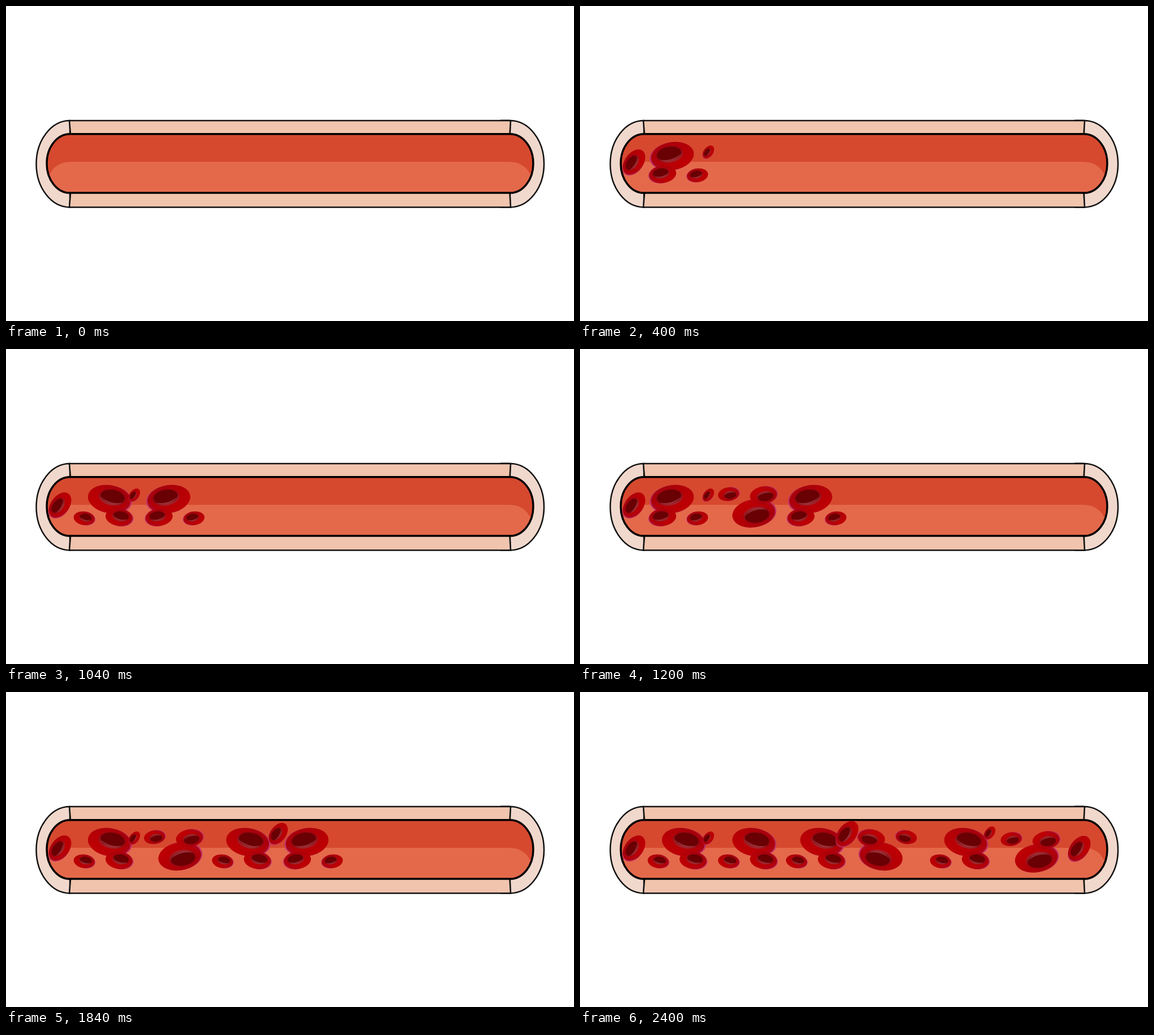
These frames come from a looping animation (1004x558 px, 2.8 s). An HTML page:

```html
<!DOCTYPE html>
<html lang="en">
<head>
<meta charset="utf-8">
<title>Blood vessel</title>
<style>
  html, body { margin: 0; width: 100%; height: 100%; overflow: hidden; background: #fff; }
  svg { display: block; width: 100vw; height: 100vh; }
</style>
</head>
<body>
<svg viewBox="0 0 1004 558">
  <defs>
    <filter id="soft" filterUnits="userSpaceOnUse" x="0" y="0" width="1004" height="558" color-interpolation-filters="sRGB">
      <feGaussianBlur stdDeviation="0.7"/>
    </filter>
    <linearGradient id="body" x1="0.1" y1="0" x2="0.8" y2="1">
      <stop offset="0" stop-color="#a2000f"/>
      <stop offset="0.45" stop-color="#b20007"/>
      <stop offset="1" stop-color="#c00003"/>
    </linearGradient>
    <linearGradient id="rim" x1="0" y1="0.4" x2="0.8" y2="0.3">
      <stop offset="0" stop-color="#c03368"/>
      <stop offset="0.4" stop-color="#ac1038"/>
      <stop offset="1" stop-color="#ba0006"/>
    </linearGradient>
    <linearGradient id="dent" x1="0.2" y1="0" x2="0.6" y2="1">
      <stop offset="0" stop-color="#8c0009"/>
      <stop offset="0.6" stop-color="#900a14"/>
      <stop offset="1" stop-color="#a3262e"/>
    </linearGradient>
    <path id="inner" d="M113 226.7H891A41 52.2 0 0 1 891 331.1H113A41 52.2 0 0 1 113 226.7Z"/>
    <clipPath id="lumen"><use href="#inner"/></clipPath>
    <g id="cell">
      <ellipse rx="39.3" ry="24.8" fill="url(#rim)"/>
      <ellipse cx="1.2" cy="-0.5" rx="38" ry="24.2" fill="url(#body)"/>
      <path d="M-33 2C-31 14-16 20 0 20" fill="none" stroke="#a80a30" stroke-width="3" opacity="0.5"/>
      <ellipse cx="-3.4" cy="-4" rx="24" ry="14.6" fill="url(#dent)"/>
      <ellipse cx="-3.8" cy="-4.8" rx="21.4" ry="12.4" fill="#690003"/>
      <path d="M-22 2C-12 7 6 6 17-2C9 9-11 12-22 2Z" fill="#a9404a" opacity="0.7"/>
    </g>
    <g id="trio">
      <use href="#cell" transform="translate(-10.8 -12.3) rotate(-10)"/>
      <use href="#cell" transform="translate(-27.6 19.8) rotate(-9) scale(.63)"/>
      <use href="#cell" transform="translate(34.2 21.6) rotate(-9) scale(.49)"/>
    </g>
  </defs>

  <g filter="url(#soft)">
    <g stroke="#111" stroke-width="2.5">
      <path fill="#f1d8cc" d="M113 203A59.5 76.7 0 0 0 113 356.4ZM891 203A60 76.7 0 0 1 891 356.4Z"/>
      <path fill="#f0c4ad" d="M112 203H892L890.5 227V332L892 356.4H112L114 332V227Z"/>
      <path d="M874 202.2H890M874 357.2H890" stroke-width="1.2"/>
    </g>
    <use href="#inner" fill="#d6492f"/>
    <path clip-path="url(#lumen)" fill="#e4694b" d="M76 301Q86 276 116 276H889Q917 276 928 301V340H76Z"/>
    <use href="#inner" fill="none" stroke="#000" stroke-width="3.5"/>
    <g id="flow"></g>
  </g>
</svg>
<script>
const STEP = 400;
const NS = "http://www.w3.org/2000/svg";
const flow = document.getElementById("flow");

const use = (id, transform) => ({ id, transform });
const trio = (x, sx = 1, sy = 1, y = 278.5) => use("trio", `translate(${x} ${y}) scale(${sx} ${sy})`);
const flip = x => trio(x, -1);
const turn = (x, y) => trio(x, -1, -1, y);
const lone = (x, y, size = 0.657) => use("cell", `translate(${x} ${y}) rotate(-54) scale(${size})`);

const entry = lone(95.3, 277.3);
const speck = lone(226.7, 259, 0.335);
const farSpeck = lone(724, 250, 0.335);

const steps = [
  [],
  [entry, trio(173), speck],
  [entry, flip(173), speck, trio(297.5)],
  [entry, trio(173), speck, turn(297.5), trio(417.5)],
  [entry, flip(173), speck, turn(297.5), flip(417.5), lone(481, 251.5, 0.557), trio(542)],
  [entry, trio(173), speck, turn(297.5), trio(417.5), lone(471, 252), trio(542), trio(672), farSpeck],
  [entry, flip(173), speck, flip(297.5), flip(417.5), lone(472, 252), trio(542, 1, -1),
   flip(672), farSpeck, turn(797, 282), lone(882.3, 278)]
];

const layers = steps.map(items => {
  const layer = document.createElementNS(NS, "g");
  for (const { id, transform } of items) {
    const node = document.createElementNS(NS, "use");
    node.setAttribute("href", "#" + id);
    node.setAttribute("transform", transform);
    layer.append(node);
  }
  flow.append(layer);
  return layer;
});

const start = performance.now();
function draw() {
  const now = Math.floor((performance.now() - start) / STEP) % steps.length;
  layers.forEach((layer, i) => layer.setAttribute("display", i === now ? "inline" : "none"));
  requestAnimationFrame(draw);
}
draw();
</script>
</body>
</html>
```
